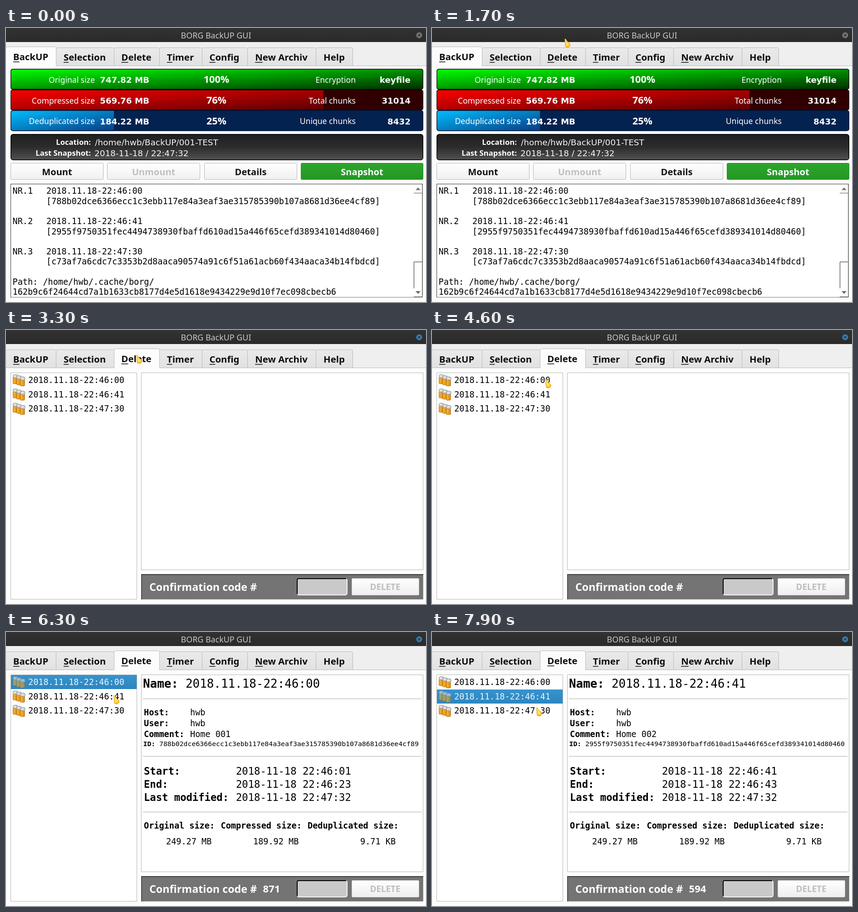
Write an HTML page with a canvas that moves like this. It is 926 px wide and 605 px high and loops after 8 s.

```html
<!DOCTYPE html>
<html lang="en">
<head>
<meta charset="utf-8">
<title>BORG BackUP GUI</title>
<style>
html, body { margin: 0; width: 100%; height: 100%; overflow: hidden; background: #fcfcfc; }
canvas { display: block; }
</style>
</head>
<body>
<canvas id="stage" width="926" height="605"></canvas>
<script>
const ctx = document.getElementById('stage').getContext('2d');
const LOOP = 8000;
const SANS = '"Noto Sans", sans-serif';
const WIDE = '"DejaVu Sans", sans-serif';
const MONO = '"DejaVu Sans Mono", monospace';
const MONO_SIZE = 18.53;

const TABS = [
  ['BackUP', -1, 110, 54.5], ['Selection', 110, 238, 173.5], ['Delete', 238, 338, 287.5],
  ['Timer', 338, 432, 384.5], ['Config', 432, 532, 481.5], ['New Archiv', 532, 683, 607],
  ['Help', 683, 764, 723.5]
];
const ARCHIVES = [
  { name: '2018.11.18-22:46:00', comment: 'Home 001', start: '22:46:01', end: '22:46:23', code: '871',
    id: '788b02dce6366ecc1c3ebb117e84a3eaf3ae315785390b107a8681d36ee4cf89' },
  { name: '2018.11.18-22:46:41', comment: 'Home 002', start: '22:46:41', end: '22:46:43', code: '594',
    id: '2955f9750351fec4494738930fbaffd610ad15a446f65cefd389341014d80460' },
  { name: '2018.11.18-22:47:30',
    id: 'c73af7a6cdc7c3353b2d8aaca90574a91c6f51a61acb60f434aaca34b14fbdcd' }
];
const USER = 'hwb';

// Pointer: one point every 100 ms from 400 ms, circling the Delete tab.
const CIRCLING = [
  [628, 0], [440, 10], [310, 24], [250, 58], [300, 87], [372, 76], [386, 38], [310, 18], [248, 50],
  [266, 82], [318, 92], [376, 78], [390, 44], [292, 23], [247, 52], [268, 84], [326, 92], [370, 86],
  [390, 56], [330, 35], [246, 46]
];
// Later rests and glides: [time, x, y].
const GLIDES = [
  [2400, 246, 46], [2800, 246, 46], [2900, 287, 54.5], [3900, 287, 54.5], [4000, 268, 67], [4100, 268, 67],
  [4200, 260, 88], [4300, 251, 112], [4400, 251, 112], [4600, 249.5, 108.5], [5900, 249.5, 108.5],
  [6400, 233.5, 147], [7700, 233.5, 147], [7900, 229.5, 166]
];

function text(str, x, y, size, { font = SANS, weight = 400, color = '#000', align = 'left' } = {}) {
  ctx.font = `${weight} ${size}px ${font}`;
  ctx.fillStyle = color;
  ctx.textAlign = align;
  ctx.fillText(str, x, y);
}

function rect(x, y, w, h, fill) {
  ctx.fillStyle = fill;
  ctx.fillRect(x, y, w, h);
}

function box(x, y, w, h, fill, stroke, radius = 0, line = 1) {
  ctx.beginPath();
  ctx.roundRect(x + line / 2, y + line / 2, w - line, h - line, radius);
  ctx.fillStyle = fill;
  ctx.fill();
  if (!stroke) return;
  ctx.lineWidth = line;
  ctx.strokeStyle = stroke;
  ctx.stroke();
}

function shape(points, fill, stroke) {
  ctx.beginPath();
  points.forEach(([x, y]) => ctx.lineTo(x, y));
  ctx.closePath();
  ctx.fillStyle = fill;
  ctx.fill();
  if (!stroke) return;
  ctx.lineWidth = 1;
  ctx.strokeStyle = stroke;
  ctx.stroke();
}

function gradient(x0, y0, x1, y1, ...colors) {
  const g = ctx.createLinearGradient(x0, y0, x1, y1);
  colors.forEach((c, i) => g.addColorStop(i / (colors.length - 1), c));
  return g;
}

const downward = (y, h, ...colors) => gradient(0, y, 0, y + h, ...colors);

function drawWindow(active) {
  rect(0, 0, 926, 605, '#fcfcfc');
  rect(0, 31, 926, 52, '#efefef');
  rect(0, 0, 926, 31, downward(0, 31, '#323232', '#2a2a2a'));
  text('BORG BackUP GUI', 463, 23, 17.9, { color: '#c9c9c9', align: 'center' });
  ctx.beginPath();
  ctx.arc(911, 16, 6.5, 0, 7);
  ctx.fillStyle = active === 0 ? '#777' : '#2f80bd';
  ctx.fill();
  ctx.beginPath();
  for (const s of [-1, 1]) {
    ctx.moveTo(908.5, 16 - 2.5 * s);
    ctx.lineTo(913.5, 16 + 2.5 * s);
  }
  ctx.lineWidth = 1.5;
  ctx.strokeStyle = '#2c2c2c';
  ctx.stroke();

  rect(0, 83, 926, 1, '#b9b9b9');
  TABS.forEach(([label, left, right, center], i) => {
    const on = i === active, top = on ? 41 : 43, base = on ? 71 : 72;
    const fill = on ? '#fcfcfc' : downward(43, 40, '#eaeaea', '#e2e2e2');
    box(left, top, right - left + 1, 84 - top, fill, '#b9b9b9', [3, 3, 0, 0]);
    if (on) rect(left + 1, 82, right - left - 1, 3, '#fcfcfc');
    text(label, center, base, 20.4, { weight: 700, align: 'center', color: '#0c0c0c' });
    if (label === 'Help') return;
    const x = center - ctx.measureText(label).width / 2;
    rect(x, base + 3, ctx.measureText(label[0]).width, 1.5, '#0c0c0c');
  });
}

// Fills a bar with a gradient that runs from corner to corner of its own box.
function fillDiagonal(x, y, w, h, from, to) {
  ctx.save();
  ctx.translate(x, y);
  ctx.scale(w, h);
  rect(0, 0, 1, 1, gradient(0, 0, 1, 1, from, to));
  ctx.restore();
}

function drawBar(y, track, border, width, from, to, [label, size, percent, info, value]) {
  ctx.save();
  ctx.beginPath();
  ctx.roundRect(10, y, 910, 46, 5);
  ctx.clip();
  rect(10, y, 910, 46, track);
  fillDiagonal(10, y, width, 46, from, to);
  ctx.restore();
  box(10, y, 910, 46, 'transparent', border, 5, 1.5);
  const base = y + 30.5, color = '#fff';
  const bold = { font: WIDE, weight: 700, color };
  text(label, 196, base, 17.6, { color, align: 'right' });
  text(size, 207, base + .5, 18.3, bold);
  text(percent, 464, base + .5, 21.6, { weight: 700, color, align: 'center' });
  text(info, 771, base, 17.6, { color, align: 'right' });
  text(value, 892, base + .5, 18.3, { ...bold, align: 'right' });
}

function drawButton(label, x, w, color = '#111', fill = downward(298, 37, '#fff', '#f0f0f0'), stroke = '#b5b5b5') {
  box(x, 298, w, 37, fill, stroke, 2);
  text(label, x + w / 2, 324.5, 20.1, { weight: 700, color, align: 'center' });
}

function drawBackupPage() {
  drawBar(90, '#002b00', '#001800', 910, '#00ff00', '#002c00',
    ['Original size', '747.82 MB', '100%', 'Encryption', 'keyfile']);
  drawBar(136, '#300000', '#1c0000', 690, '#ff0000', '#580000',
    ['Compressed size', '569.76 MB', '76%', 'Total chunks', '31014']);
  drawBar(181.5, '#04224f', '#02143a', 228, '#00bfff', '#083c84',
    ['Deduplicated size', '184.22 MB', '25%', 'Unique chunks', '8432']);

  box(10, 234, 910, 58, downward(234, 58, '#1e1e1e', '#2c2c2c', '#525252'), '#050505', 5, 1.5);
  const caption = { weight: 700, color: '#fff', align: 'right' };
  const detail = { font: WIDE, color: '#f4f4f4' };
  text('Location:', 187, 258, 16.7, caption);
  text('Last Snapshot:', 187, 282, 16.7, caption);
  text(`/home/${USER}/BackUP/001-TEST`, 196, 259, 18.5, detail);
  text('2018-11-18 / 22:47:32', 195, 283, 18.4, detail);

  drawButton('Mount', 10, 205);
  drawButton('Unmount', 223, 205, '#c0c0c0');
  drawButton('Details', 437, 205);
  drawButton('Snapshot', 650, 270, '#fff', downward(298, 37, '#2da62d', '#239723'), '#1c8a1c');

  box(10, 344, 909, 251, '#fff', '#777');
  rect(10, 344, 909, 1, '#333');
  rect(10, 344, 1, 251, '#333');
  const mono = { font: MONO };
  ARCHIVES.forEach(({ name, id }, i) => {
    const y = 366.3 + i * 66.9;
    text(`NR.${i + 1}`, 14.5, y, MONO_SIZE, mono);
    text(name, 89, y, MONO_SIZE, mono);
    text(`[${id}]`, 89, y + 22.3, MONO_SIZE, mono);
  });
  text(`Path: /home/${USER}/.cache/borg/`, 14.5, 566.8, MONO_SIZE, mono);
  text('162b9c6f24644cd7a1b1633cb8177d4e5d1618e9434229e9d10f7ec098cbecb6', 14.5, 589.1, MONO_SIZE, mono);

  rect(899, 364, 18, 1, '#555');
  shape([[903, 358], [908.5, 352], [914, 358]], '#777');
  box(899, 516, 19, 59, '#fff', '#222');
  rect(900, 574, 17, 1, '#fff');
  shape([[903, 581], [908.5, 587], [914, 581]], '#666');
  rect(899, 593, 18, 1, '#555');
  rect(917, 345, 1, 249, '#888');
}

function drawMugs(x, y, dimmed) {
  for (let i = 0; i < 3; i++) {
    const mx = x + i * 8, my = y + i * 2.5;
    box(mx, my + 6, 10.5, 15, gradient(mx, 0, mx + 10, 0, '#ffbd2e', '#e08a0a'), '#a8660a', 1.5);
    box(mx, my, 11.5, 8.5, '#d2d2d2', '#8b8b8b', 3);
    rect(mx + 3, my + 2.5, 4, 2, '#f0f0f0');
  }
  if (dimmed) rect(x, y, 28, 27, '#308cc666');
}

function drawArchiveList(selected, hovered) {
  box(10, 94, 279, 501, '#fff', '#b5b5b5');
  ARCHIVES.forEach(({ name }, i) => {
    const y = 95 + i * 31.5, on = i === selected;
    if (on) rect(11, Math.round(y), 277, 31, downward(y, 31, '#3793cd', '#2c86c1'));
    if (i === hovered) box(46, Math.round(y), 242, 31, downward(y, 31, '#eaf3fa', '#dfecf6'), '#a9c9de', 1);
    drawMugs(15, y + 3, on);
    text(name, 49, y + 22.3, MONO_SIZE, { font: MONO, color: on ? '#e9f4fb' : '#000' });
  });
}

function drawArchive({ name, comment, start, end, id }) {
  const row = (label, value, x, valueX, y, size, valueY = y) => {
    text(label, x, y, size, { font: MONO, weight: 700 });
    text(value, valueX, valueY, size, { font: MONO });
  };
  row('Name:', name, 302, 396, 122.5, 25.9);
  row('Host:', USER, 304, 406, 184, MONO_SIZE);
  row('User:', USER, 304, 406, 208.3, MONO_SIZE);
  row('Comment:', comment, 304, 406, 232.3, MONO_SIZE);
  row('ID:', id, 302.5, 338, 252.3, 14.85);
  row('Start:', `2018-11-18 ${start}`, 304, 507, 315, 22.2);
  row('End:', `2018-11-18 ${end}`, 304, 507, 344, 22.2);
  row('Last modified:', '2018-11-18 22:47:32', 304, 507, 372.7, 22.2);
  row('Original size:', '249.27 MB', 304, 353, 434, MONO_SIZE, 468.5);
  row('Compressed size:', '189.92 MB', 473.5, 545, 434, MONO_SIZE, 468.5);
  row('Deduplicated size:', '9.71 KB', 665, 781, 434, MONO_SIZE, 468.5);
  for (const y of [147, 274, 397]) rect(302, y, 614, 1, '#a9a9a9');
}

function drawConfirmation(code) {
  box(298, 539, 622, 56, '#747474', '#8c8c8c');
  rect(298, 539, 622, 2, '#3a3a3a');
  rect(298, 539, 1.5, 56, '#3a3a3a');
  text('Confirmation code #', 316, 576, 23.3, { weight: 700, color: '#fff' });
  text(code, 585.5, 575, 22, { weight: 700, color: '#fff', align: 'center' });
  // The inset field is dark along its top and left, light along its bottom and right.
  box(641, 548, 112, 38, '#c9c9c9', '#f4f4f4', 4, 2);
  ctx.beginPath();
  ctx.moveTo(642, 583);
  ctx.lineTo(642, 552);
  ctx.quadraticCurveTo(642, 549, 645, 549);
  ctx.lineTo(750, 549);
  ctx.strokeStyle = '#000';
  ctx.stroke();
  box(762, 548, 149, 38, downward(548, 38, '#fff', '#eee'), '#c4c4c4', 2);
  text('DELETE', 836, 574, 18.8, { weight: 700, color: '#bebebe', align: 'center' });
}

function drawDeletePage(t) {
  const selected = t < 5400 ? -1 : t < 7300 ? 0 : 1;
  const loading = (t >= 4800 && t < 5400) || (t >= 6700 && t < 7300);
  drawArchiveList(selected, loading ? selected + 1 : -1);
  box(298, 94, 622, 436, '#fff', '#b5b5b5');
  if (loading) {
    text('Loading Data please wait...', 374, 232, 29.6, { font: MONO, weight: 700 });
  } else if (selected >= 0) {
    drawArchive(ARCHIVES[selected]);
  }
  drawConfirmation(selected < 0 ? '' : ARCHIVES[selected].code);
}

function pointerAt(t) {
  if (t < 400) return null;
  if (t <= 2400) return CIRCLING[(t - 400) / 100];
  const next = GLIDES.findIndex(([time]) => time >= t);
  const [t0, x0, y0] = GLIDES[next - 1], [t1, x1, y1] = GLIDES[next];
  const k = (t - t0) / (t1 - t0);
  return [x0 + (x1 - x0) * k, y0 + (y1 - y0) * k];
}

function drawPointer([x, y]) {
  ctx.save();
  ctx.translate(x, y);
  shape([[1, 1], [2.5, 1], [6.5, 7], [12, 11.5], [13, 15.5], [8.5, 20], [2.5, 18.5], [1.5, 12]],
    gradient(1, 3, 12, 18, '#ffe27a', '#ffcc38', '#f8bd14'), '#dfa21c');
  shape([[3.5, 9], [5.5, 8.5], [10, 13], [8, 16], [4, 15]], '#ffe17c');
  ctx.restore();
}

function draw() {
  const t = Math.floor((performance.now() % LOOP) / 100) * 100;
  const deleting = t >= 3300;
  drawWindow(deleting ? 2 : 0);
  if (deleting) drawDeletePage(t);
  else drawBackupPage();
  const pointer = pointerAt(t);
  if (pointer) drawPointer(pointer);
  requestAnimationFrame(draw);
}
requestAnimationFrame(draw);
</script>
</body>
</html>
```
